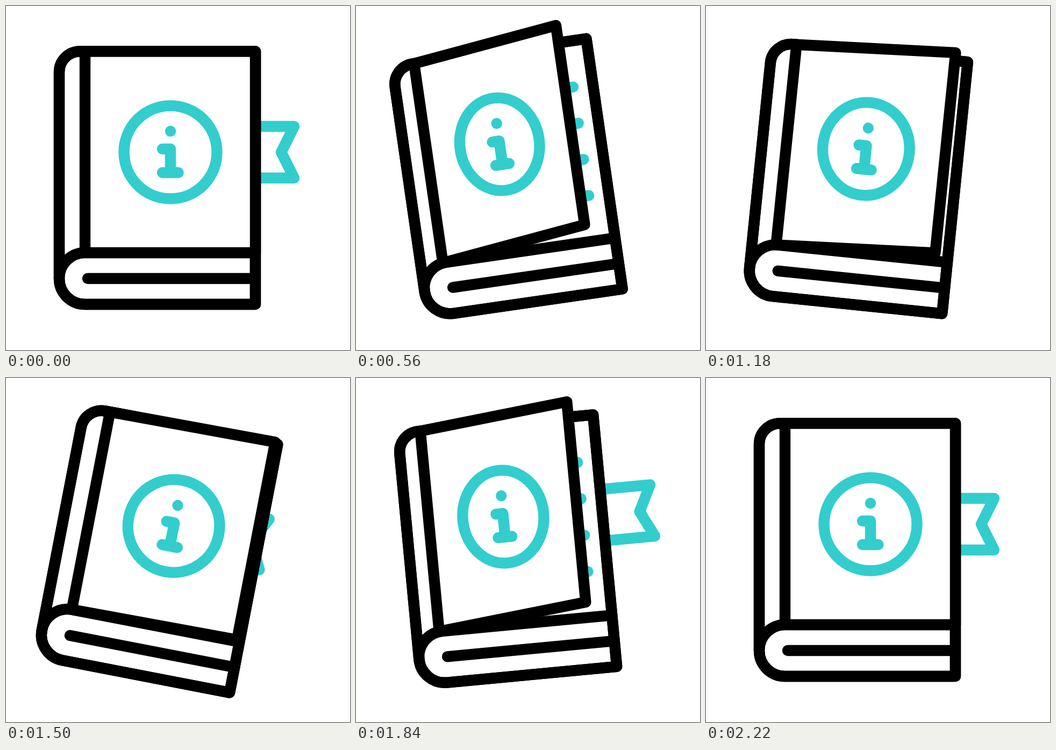
Write an HTML page with a canvas that moves like this. It is 640 by 640 pixels and loops after 2400 ms.

```html
<!DOCTYPE html>
<html lang="en">
<head>
<meta charset="utf-8">
<title>Info book</title>
<style>
  html, body { margin: 0; width: 100%; height: 100%; overflow: hidden; background: #fff; }
  canvas { display: block; width: 640px; height: 640px; }
</style>
</head>
<body>
<canvas id="stage" width="640" height="640"></canvas>
<script>
const ctx = document.getElementById('stage').getContext('2d');
const LOOP = 2400, STEP = 20;
const INK = '#000', TEAL = '#33cdce', PAPER = '#fff';
const PIVOT = { x: 281.5, y: 320 };

// Each track lists [time in ms, value], eased between neighbours.
const turn = [[200, 0], [775, -12], [1402, 13], [1877, -5.7], [2215, 0]];
const open = [[260, 0], [775, 1.08], [1402, 0], [1877, 0.605], [2215, 0]];
const slide = [[200, 0], [560, -80], [1400, -80], [1765, 23], [2215, 0]];

function valueAt(track, t) {
  if (t <= track[0][0]) return track[0][1];
  for (let i = 1; i < track.length; i++) {
    const [t0, a] = track[i - 1], [t1, b] = track[i];
    if (t < t1) {
      const p = (t - t0) / (t1 - t0);
      return a + (b - a) * p * p * (3 - 2 * p);
    }
  }
  return track[track.length - 1][1];
}

function draw(path, color, fill) {
  if (fill) {
    ctx.fillStyle = fill;
    ctx.fill(path);
  }
  ctx.strokeStyle = color;
  ctx.stroke(path);
}

const line = (d, color, fill) => draw(new Path2D(d), color, fill);

function drawRibbon(dx) {
  ctx.save();
  ctx.translate(dx, 0);
  line('M400 224H536L512 272L536 320H400', TEAL);
  ctx.restore();
}

function drawBlock() {
  const body = 'M137 84.5H464V555H147A48 48 0 0 1 99 507V123A38.5 38.5 0 0 1 137 84.5Z';
  line(body, INK, PAPER);
  for (let i = 0; i < 4; i++) line(`M200 ${170 + 68 * i}H427`, TEAL);
  line(body, INK);
  line('M99 507A48 48 0 0 1 147 459H464M152 507H464', INK);
}

function drawCover(k) {
  const hinge = 147 - 10 * k, edge = 464 - 78 * k, lift = 48.3 * k;
  line(`M${hinge} 84.5L${edge} ${84.5 - lift}V${459 - lift}L${hinge} 459Z`, INK, PAPER);
  drawEmblem(306 - 44.1 * k, 272 - 24.2 * k, (edge - hinge) / 317);
}

// Narrows with the cover while the line weight stays the same.
function drawEmblem(x, y, sx) {
  const ring = new Path2D();
  ring.ellipse(x, y, 86.5 * sx, 86.5, 0, 0, Math.PI * 2);
  draw(ring, TEAL);

  const left = x - 15 * sx, right = x + 14.5 * sx;
  line(`M${left} ${y - 6}H${x}V${y + 38}M${left} ${y + 38}H${right}`, TEAL);

  ctx.beginPath();
  ctx.arc(x, y - 39, 10.2, 0, Math.PI * 2);
  ctx.fillStyle = TEAL;
  ctx.fill();
}

function render(t) {
  ctx.fillStyle = PAPER;
  ctx.fillRect(0, 0, 640, 640);
  ctx.save();
  ctx.lineWidth = 20.4;
  ctx.lineCap = ctx.lineJoin = 'round';
  ctx.translate(PIVOT.x, PIVOT.y);
  ctx.rotate(valueAt(turn, t) * Math.PI / 180);
  ctx.translate(-PIVOT.x, -PIVOT.y);
  drawRibbon(valueAt(slide, t));
  drawBlock();
  drawCover(valueAt(open, t));
  ctx.restore();
}

const start = performance.now();
function tick() {
  const t = (performance.now() - start) % LOOP;
  render(Math.floor(t / STEP) * STEP);
  requestAnimationFrame(tick);
}
tick();
</script>
</body>
</html>
```
